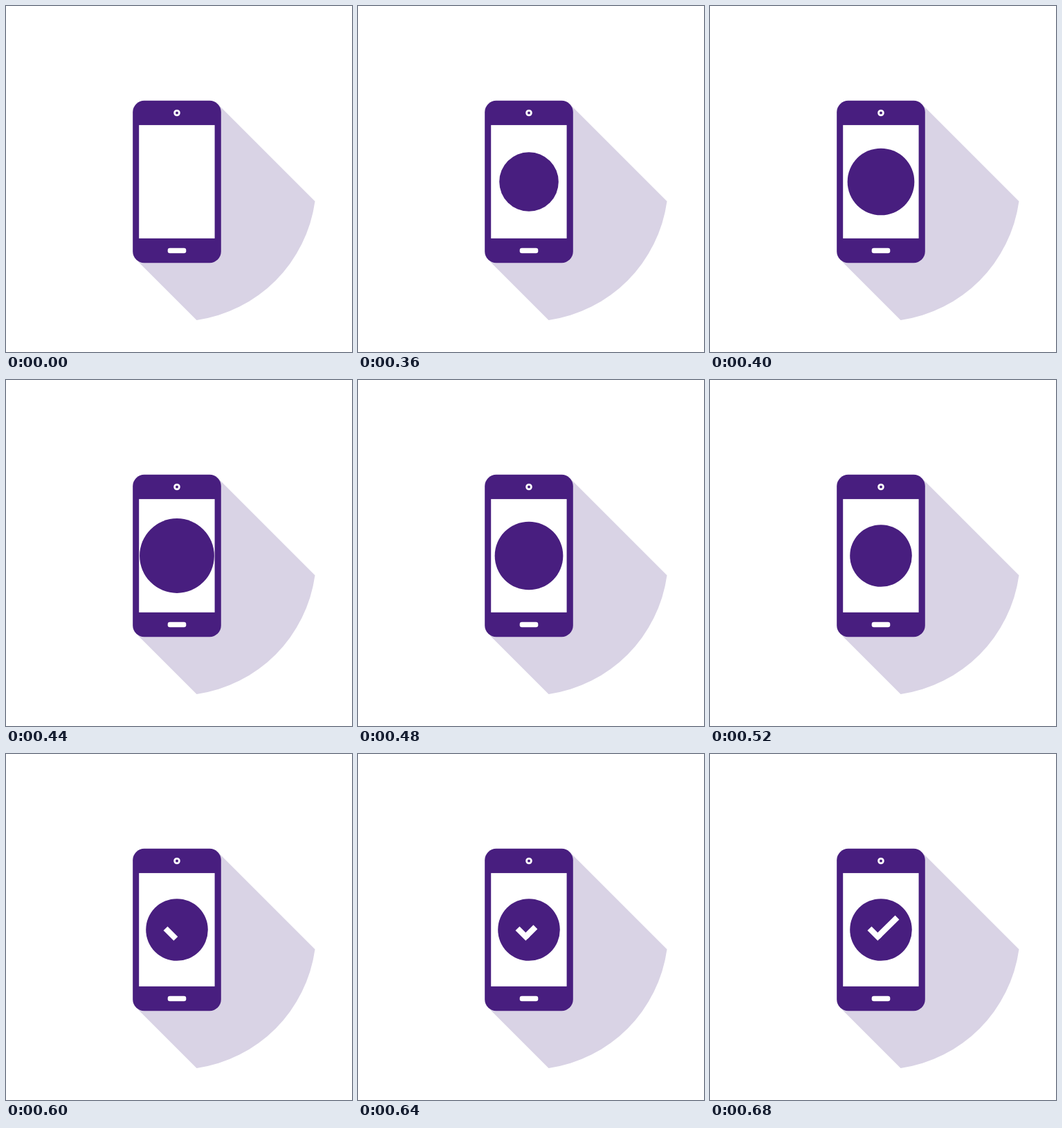
An HTML page that plays this animation: 500x500 px, repeating every 4.48 s.

```html
<!DOCTYPE html>
<html lang="en">
<head>
<meta charset="utf-8">
<title>Phone confirmation</title>
<style>
  html, body { margin: 0; width: 100%; height: 100%; overflow: hidden; background: #fff; }
  svg { display: block; width: 100%; height: 100%; }
</style>
</head>
<body>
<svg viewBox="0 0 500 500">
  <path d="M306 141.8 L446.5 282.3 A201.7 201.7 0 0 1 275.5 454 L188 366.5 Z" fill="#d9d3e5"/>
  <rect x="183.2" y="136.8" width="127.6" height="234.4" rx="16.5" fill="#481e7f"/>
  <rect x="192.2" y="172.1" width="109.4" height="163.7" fill="#fff"/>
  <circle cx="247" cy="154.5" r="3.4" fill="#481e7f" stroke="#fff" stroke-width="2.8"/>
  <rect x="233.7" y="349.7" width="26.6" height="7.6" rx="3" fill="#fff"/>
  <circle id="disc" cx="247" cy="254" r="0" fill="#481e7f"/>
  <g stroke="#fff" stroke-width="8.4">
    <line id="shortBar"/>
    <line id="longBar"/>
  </g>
</svg>
<script>
  const LOOP = 4480, STEP = 40;
  const disc = document.getElementById('disc');
  const shortBar = document.getElementById('shortBar');
  const longBar = document.getElementById('longBar');

  const progress = (t, from, to) => Math.min(1, Math.max(0, (t - from) / (to - from)));
  const mix = (a, b, p) => a + (b - a) * p;

  function drawBar(line, x1, y1, x2, y2, p) {
    line.setAttribute('x1', x1);
    line.setAttribute('y1', y1);
    line.setAttribute('x2', mix(x1, x2, p));
    line.setAttribute('y2', mix(y1, y2, p));
    line.setAttribute('visibility', p > 0 ? 'visible' : 'hidden');
  }

  function radius(t) {
    if (t < 360) return 0;
    return t < 440 ? mix(42.8, 53.9, progress(t, 360, 440))
                   : mix(53.9, 44.8, progress(t, 440, 520));
  }

  function render(time) {
    const t = Math.floor((time % LOOP) / STEP) * STEP;
    disc.setAttribute('r', radius(t));
    drawBar(shortBar, 230.5, 252.1, 245.3, 266.9, progress(t, 520, 600));
    drawBar(longBar, 242.3, 264, 270.5, 236.2, progress(t, 600, 680));
  }

  const start = performance.now();
  function tick() {
    render(performance.now() - start);
    requestAnimationFrame(tick);
  }
  tick();
</script>
</body>
</html>
```
